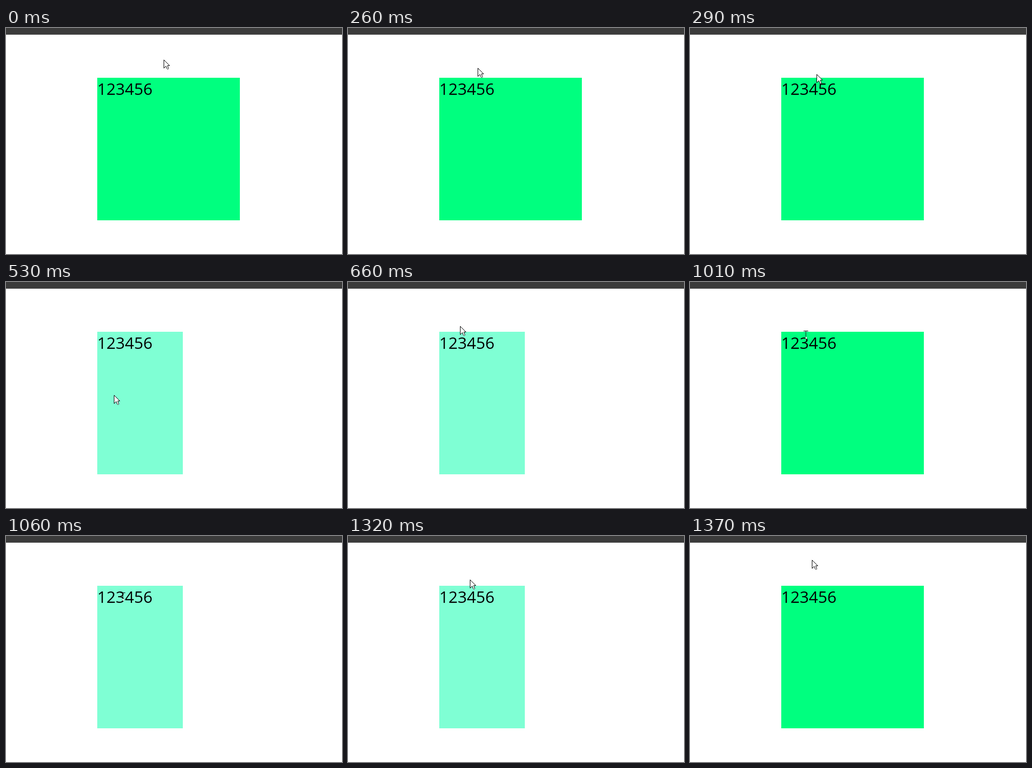
Recreate the animation shown at these times as an HTML page with a canvas. Size 648 by 436 pixels, loop 2140 ms.

```html
<!DOCTYPE html>
<html lang="en">
<head>
<meta charset="utf-8">
<style>
  html, body { margin: 0; width: 100%; height: 100%; overflow: hidden; background: #fff; }
  canvas { display: block; }
</style>
</head>
<body>
<canvas id="stage" width="648" height="436"></canvas>
<script>
const ctx = document.getElementById('stage').getContext('2d');
const LOOP = 2140, STEP = 30, PHASE = 20;
const BOX = { x: 176, y: 96, size: 275, hoverWidth: 165 };
const TEXT = { right: 283, bottom: 140, baseline: 129 };

// Turning points of the pointer; a smooth curve joins them.
const path = [
  { t: 0, x: 304, y: 61 },
  { t: 90, x: 292, y: 55 },
  { t: 260, x: 250, y: 77 },
  { t: 530, x: 208, y: 218 },
  { t: 560, x: 207, y: 215 },
  { t: 640, x: 215, y: 92 },
  { t: 680, x: 218, y: 84 },
  { t: 800, x: 218, y: 49 },
  { t: 1010, x: 223, y: 102 },
  { t: 1180, x: 235, y: 190 },
  { t: 1310, x: 235, y: 84 },
  { t: 1370, x: 235, y: 46 }
];
const last = path.length - 1;
const arrow = new Path2D('M.5 .5V16.5L4.5 12.5L6.5 17.5L7.5 18.5H8.5L9.5 17.5L7.5 11.5H11.5Z');

function slope(i, axis) {
  if (i === 0 || i === last) return 0;
  const before = path[i - 1], after = path[i + 1];
  return (after[axis] - before[axis]) / (after.t - before.t);
}

function pointerAt(time) {
  const t = Math.min(Math.max(time, 0), path[last].t);
  const i = Math.max(1, path.findIndex(point => point.t >= t));
  const a = path[i - 1], b = path[i];
  const span = b.t - a.t, u = (t - a.t) / span, v = 1 - u;
  const along = axis => Math.round(
    a[axis] * v * v * (1 + 2 * u) + b[axis] * u * u * (1 + 2 * v) +
    span * u * v * (slope(i - 1, axis) * v - slope(i, axis) * u));
  return { x: along('x'), y: along('y') };
}

function fill(color, x, y, w, h) {
  ctx.fillStyle = color;
  ctx.fillRect(x, y, w, h);
}

function drawArrow(x, y) {
  ctx.save();
  ctx.translate(x, y);
  ctx.fillStyle = '#fff';
  ctx.strokeStyle = '#000';
  ctx.fill(arrow);
  ctx.stroke(arrow);
  ctx.restore();
}

function drawTextCursor(x, y) {
  fill('#000', x - 4, y - 8, 9, 1);
  fill('#222', x, y - 7, 1, 12);
  fill('#fff', x, y + 4, 2, 4);
}

function draw(time) {
  const t = PHASE + Math.floor((time - PHASE) / STEP) * STEP;
  const { x, y } = pointerAt(t);
  // The page reacts one step after the pointer.
  const hover = pointerAt(t - STEP).y >= BOX.y;

  fill('#fff', 0, 0, 648, 436);
  fill('#3b3b3b', 0, 0, 648, 12);
  fill('#555', 0, 12, 648, 1);
  fill(hover ? '#7fffd4' : '#00ff7f', BOX.x, BOX.y, hover ? BOX.hoverWidth : BOX.size, BOX.size);

  ctx.fillStyle = '#000';
  ctx.font = '31px "Open Sans", "Noto Sans", sans-serif';
  ctx.fillText('123456', BOX.x, TEXT.baseline);

  const overText = x < TEXT.right && y >= BOX.y && y < TEXT.bottom;
  (overText ? drawTextCursor : drawArrow)(x, y);
}

const started = performance.now();
function frame() {
  draw((performance.now() - started) % LOOP);
  requestAnimationFrame(frame);
}
frame();
</script>
</body>
</html>
```
